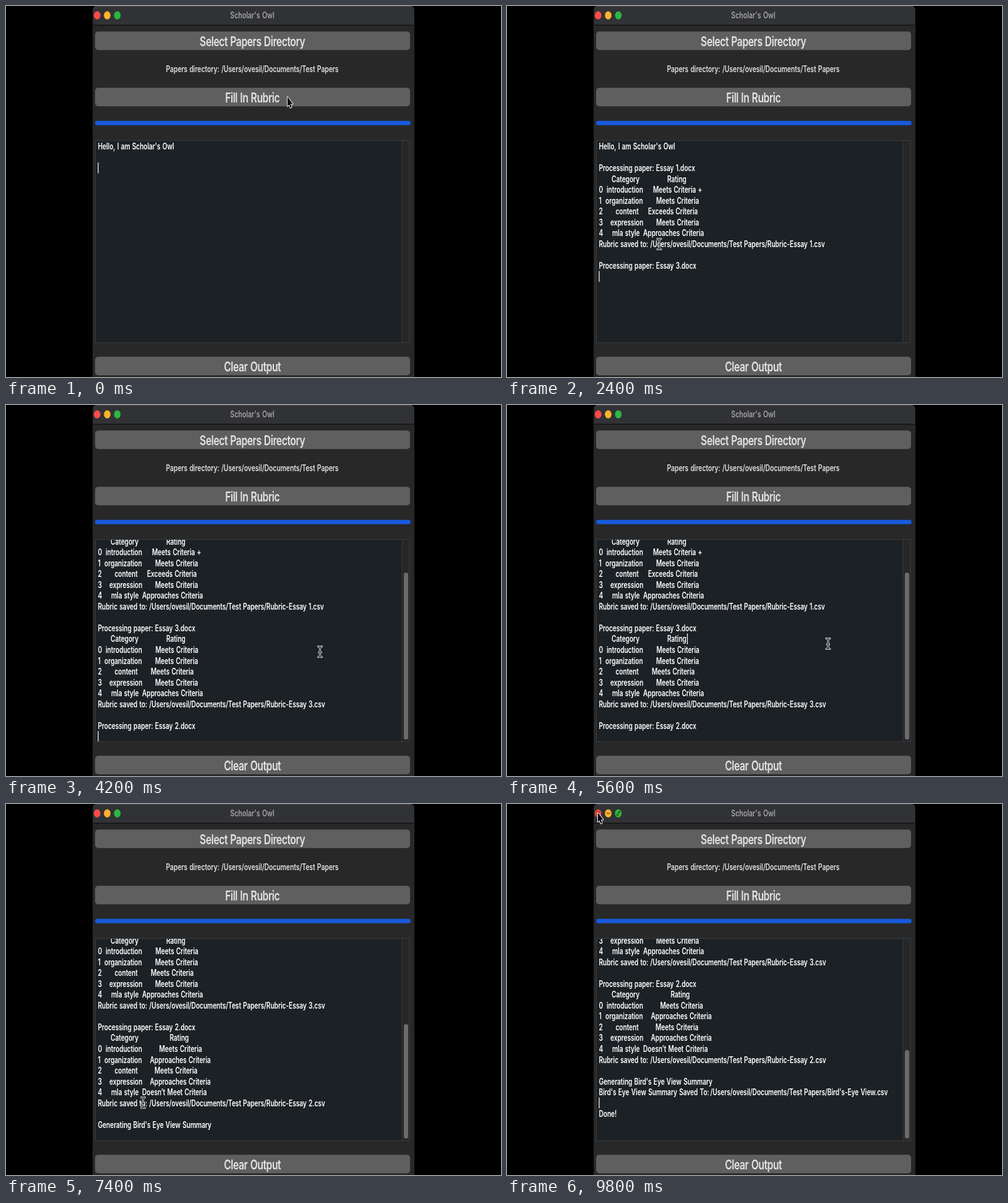
These frames come from a looping animation (800 by 600 pixels, 9900 ms). An HTML page with a canvas:

```html
<!DOCTYPE html>
<html lang="en">
<head>
<meta charset="utf-8">
<title>Scholar's Owl</title>
<style>
  html, body { margin: 0; width: 100%; height: 100%; overflow: hidden; background: #000; }
  canvas { display: block; }
</style>
</head>
<body>
<canvas id="stage" width="800" height="600"></canvas>
<script>
const ctx = document.getElementById('stage').getContext('2d');
const LOOP = 9900, STEP = 100;
const NARROW = 0.73;              // the whole window is squeezed sideways
const LINE = 17.54, LEFT = 148.5;
const FONT = 'Inter, Roboto, sans-serif';
const DIR = '/Users/ovesil/Documents/Test Papers';

// A line of output is a list of [x, text] cells.
const line = text => [[LEFT, text]];
const NAMES = [[161, 'introduction'], [159, 'organization'], [175.5, 'content'], [167, 'expression'], [170, 'mla style']];
const essay = (n, ratingX, ratings) => [
  line(`Processing paper: Essay ${n}.docx`),
  [[169, 'Category'], [ratingX, 'Rating']],
  ...ratings.map((rating, i) => [[LEFT, String(i)], NAMES[i], rating]),
  [[LEFT, 'Rubric saved to:'], [231.5, `${DIR}/Rubric-Essay ${n}.csv`]],
  []
];
const MEETS = 'Meets Criteria', NEAR = 'Approaches Criteria';
const LINES = [
  line("Hello, I am Scholar's Owl"), [],
  ...essay(1, 259, [[236, MEETS + ' +'], [241, MEETS], [228, 'Exceeds Criteria'], [241, MEETS], [220, NEAR]]),
  ...essay(3, 259, [[241.5, MEETS], [241, MEETS], [234, MEETS], [241, MEETS], [220, NEAR]]),
  ...essay(2, 264.5, [[247.5, MEETS], [232.5, NEAR], [240, MEETS], [232.5, NEAR], [220, 'Doesn’t Meet Criteria']]),
  line("Generating Bird's Eye View Summary"),
  [[LEFT, "Bird's Eye View Summary Saved To:"], [328.5, `${DIR}/Bird's-Eye View.csv`]],
  [],
  line('Done!')
];

// start time, last line of the document, caret line, caret x
const STAGES = [
  [0, 2, 2], [500, 3, 3], [1400, 12, 12], [3500, 12, 11, 306], [3900, 21, 21],
  [4600, 21, 12, 291.5], [5800, 30, 30], [7500, 34, 34], [8800, 34, 31]
];
const THUMB_TOP = { 21: 271, 30: 356, 34: 398 };

// time, x, y of the pointer
const PATH = [
  [0, 455, 147], [600, 455, 147], [1100, 400, 245], [2300, 246, 385], [2600, 246, 385],
  [3400, 496, 412], [3900, 496, 412], [4500, 519, 386], [5800, 519, 386], [6700, 235, 486],
  [7200, 235, 486], [8000, 149, 467], [8300, 149, 467], [8700, 149, 486], [9100, 149, 486],
  [9700, 147, 14], [LOOP, 147, 14]
];

function pointerAt(t) {
  const i = PATH.findIndex(p => p[0] > t);
  const [t0, x0, y0] = PATH[i - 1], [t1, x1, y1] = PATH[i];
  const k = (t - t0) / (t1 - t0), e = k * k * (3 - 2 * k);
  return [x0 + (x1 - x0) * e, y0 + (y1 - y0) * e];
}

function text(s, x, y, size, color, align = 'left', spacing = -0.12) {
  ctx.save();
  ctx.scale(NARROW, 1);
  ctx.font = `600 ${size}px ${FONT}`;
  ctx.letterSpacing = spacing + 'px';
  ctx.wordSpacing = '1px';
  ctx.textAlign = align;
  ctx.fillStyle = color;
  ctx.fillText(s, x / NARROW, y);
  ctx.restore();
}

function box(x, y, w, h, color, radius = 0) {
  ctx.fillStyle = color;
  ctx.beginPath();
  ctx.roundRect(x, y, w, h, radius);
  ctx.fill();
}

function button(label, y) {
  box(144, y, 509, 30, '#5f5f5f', 5);
  text(label, 398.2, y + 23.7, 21.5, '#e4e4e4', 'center', -0.6);
}

function stroke(d, color, width) {
  ctx.strokeStyle = color;
  ctx.lineWidth = width;
  ctx.stroke(new Path2D(d));
}

function light(x, color, glyph, hover) {
  ctx.fillStyle = color;
  ctx.beginPath();
  ctx.ellipse(x, 15.2, 5.3, 6.6, 0, 0, 7);
  ctx.fill();
  if (!hover) return;
  ctx.save();
  ctx.translate(x, 15.2);
  stroke(glyph, 'rgba(60,20,0,.7)', 1.3);
  ctx.restore();
}

function drawWindow(hover) {
  box(0, 0, 800, 600, '#000');
  box(140.5, 0, 519, 606, '#505052', [6, 6, 0, 0]);
  box(141, 1, 518, 605, '#282828', [6, 6, 0, 0]);
  box(141, 1, 518, 29.5, '#313235', [6, 6, 0, 0]);
  box(141, 30.5, 518, 1.2, '#101010');
  light(147.3, hover ? '#e8463f' : '#fc4b48', 'M-2.3-3L2.3 3M2.3-3L-2.3 3', hover);
  light(163.6, '#fdb32b', 'M-3 0H3', hover);
  light(179.9, '#2bb840', 'M-2.2 1V3H0M2.2-1V-3H0M-2 2.6L2-2.6', hover);
  text("Scholar's Owl", 398, 20, 14.5, '#a3a3a4', 'center', 0);
  button('Select Papers Directory', 41.3);
  text('Papers directory: ' + DIR, 398, 107.2, 14.3, '#dedede', 'center');
  button('Fill In Rubric', 132.3);
  box(144, 185.7, 509.8, 7, '#175adb', 3);
  box(144, 217, 508.5, 328, '#3a3b3c');
  box(145, 218, 506.5, 326, '#272728');
  box(145, 218, 495, 326, '#1c2125');
  box(639.5, 218, 1, 326, '#3a3b3c');
  button('Clear Output', 567.2);
}

function drawOutput(t) {
  const [start, last, caretLine, caretX = 149] = STAGES.findLast(s => s[0] <= t);
  const scroll = last < 21 ? 0 : 59 + (last - 21) * LINE;
  ctx.save();
  ctx.beginPath();
  ctx.rect(145, 218, 495, 326);
  ctx.clip();
  LINES.slice(0, last).forEach((cells, i) => {
    for (const [x, s] of cells) text(s, x, 232 + i * LINE - scroll, 14, '#fff');
  });
  if ((t - start) % 1000 < 500) box(caretX - 0.6, 218 + caretLine * LINE - scroll, 1.2, 17.5, '#fff');
  ctx.restore();
  if (THUMB_TOP[last]) box(643, THUMB_TOP[last], 7, 541 - THUMB_TOP[last], '#6b6b6c', 3.5);
}

function drawPointer(x, y) {
  ctx.save();
  ctx.translate(x, y);
  ctx.lineJoin = ctx.lineCap = 'round';
  if (x > 144 && x < 640 && y > 218 && y < 544) {
    const beam = 'M-3-8.5Q0-8.5 0-5.5Q0-8.5 3-8.5M0-5.5V5.5M-3 8.5Q0 8.5 0 5.5Q0 8.5 3 8.5M-1.8 1H1.8';
    stroke(beam, '#e6e6e6', 3);
    stroke(beam, '#15191c', 1.2);
  } else {
    const arrow = 'M0 0V15.2L2.6 12.2L4.6 17.6L6.6 16.6L4.6 11.4H8.4Z';
    stroke(arrow, '#f0f0f0', 2);
    ctx.fillStyle = '#000';
    ctx.fill(new Path2D(arrow));
  }
  ctx.restore();
}

function frame() {
  const t = Math.floor(performance.now() % LOOP / STEP) * STEP;
  const [x, y] = pointerAt(t);
  drawWindow(y < 30 && x < 190);
  drawOutput(t);
  drawPointer(x, y);
  requestAnimationFrame(frame);
}
frame();
</script>
</body>
</html>
```
